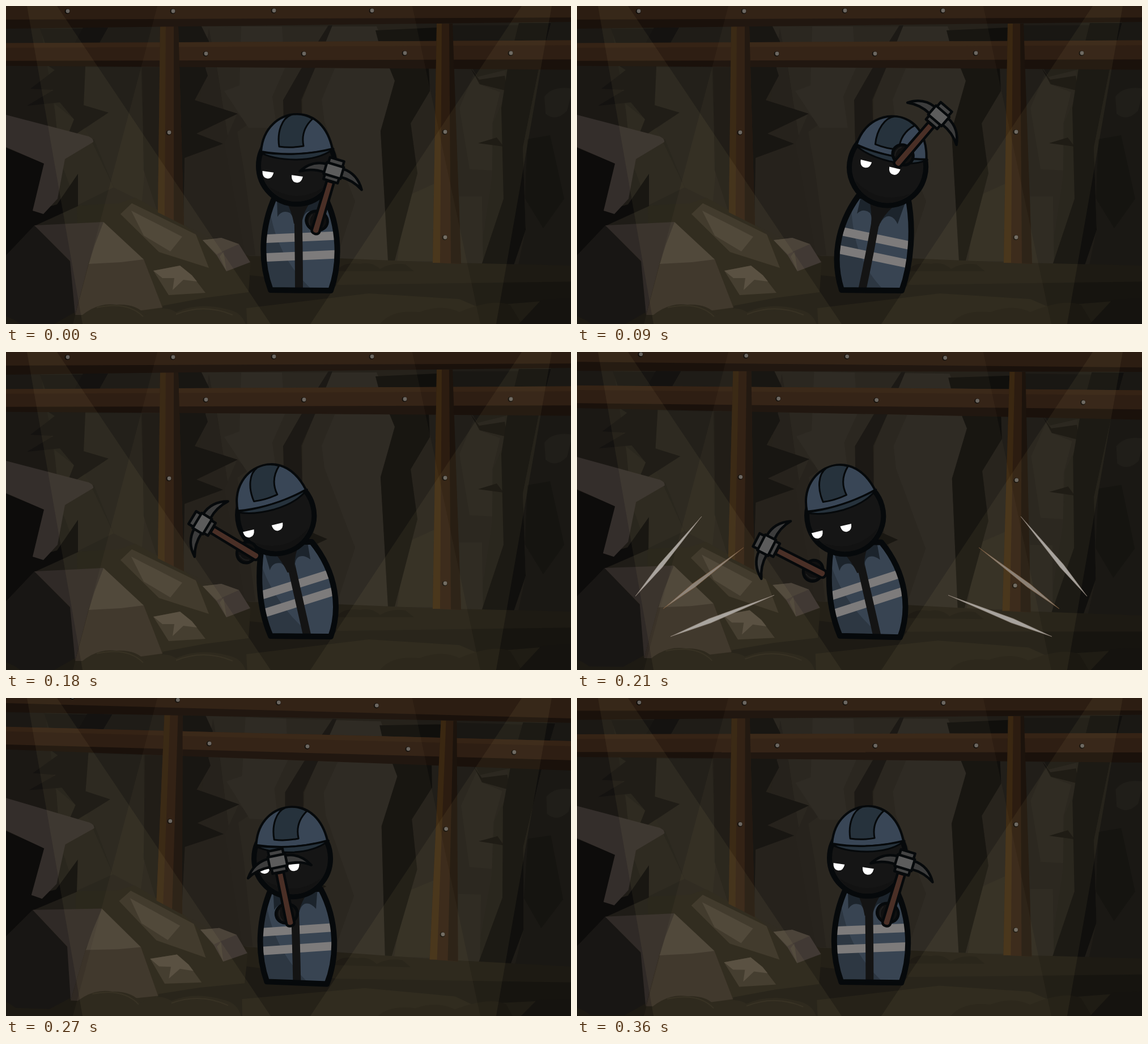
An HTML page for the animation above (0.42 s loop, 997 by 561 pixels).

```html
<!DOCTYPE html>
<html lang="en">
<head>
<meta charset="utf-8">
<title>Miner</title>
<style>
html, body { margin: 0; width: 100%; height: 100%; overflow: hidden; background: #12110e; }
svg { display: block; width: 100%; height: 100%; }
.ink { stroke: #06090b; stroke-linejoin: round; stroke-linecap: round; }
</style>
</head>
<body>
<svg viewBox="0 0 997 561" preserveAspectRatio="none">
<defs>
  <clipPath id="vest"><path id="vestClip"/></clipPath>
</defs>

<g id="cave">
  <path fill="#1f1c17" d="M-80-80H1080V650H-80Z"/>
  <!-- back wall -->
  <path fill="#1b1814" d="M-80 30H60L75 120L85 180L105 260L0 300H-80Z"/>
  <path fill="#23201a" d="M140 108L238 108L245 290L240 345L190 320L155 235L105 240L180 188L137 175Z"/>
  <path fill="#24211a" d="M85 172L140 215L190 320L125 352L95 270Z"/>
  <path fill="#171512" d="M60 40H178L150 68H70Z"/>
  <path fill="#141210" d="M136 38H180L142 106H100Z"/>
  <path fill="#141210" d="M75 106H140L137 175L181 188L105 238L120 200L95 170L37 176L84 148L43 146L86 113Z"/>
  <path fill="#1a1713" d="M240 108H275L268 365L243 290Z"/>
  <path fill="#24211c" d="M345 36H575L520 115L492 165L490 215L500 445H425L397 270L372 108Z"/>
  <path fill="#1f1c18" d="M358 40L372 110L425 440L312 385L315 268L340 180Z"/>
  <path fill="#201d19" d="M408 190L428 208L408 222L420 290L440 440H422L385 243Z"/>
  <path fill="#282520" d="M415 36H487L492 110L470 160L478 215H428L385 150L412 140Z"/>
  <path fill="#110f0d" d="M304 34H344L358 62L352 110L356 123L333 166L409 190L336 225L383 243L315 268L313 385L300 378Z"/>
  <path fill="#282520" d="M575 36H654L686 110L686 135L661 220L675 449H585L523 215V165L545 110Z"/>
  <path fill="#24211c" d="M545 110H580L557 165L562 205L616 345L585 440L523 260V165Z"/>
  <path fill="#151310" d="M569 34H576L546 108L521 165L523 240H491L489 166L520 112Z"/>
  <path fill="#12100d" d="M520 310L567 330L535 345Z"/>
  <path fill="#211e19" d="M745 110H880L885 150L860 205L858 300L835 457H680L725 295L714 205Z"/>
  <path fill="#26231c" d="M706 336L757 313L755 450H690Z"/>
  <path fill="#100f0c" d="M652 43L760 38V110H746L748 150L714 207L726 295L686 449H674L661 221L686 132L677 110L700 62H657Z"/>
  <path fill="#191713" d="M788 34H905L885 112L832 125L822 108H790Z"/>
  <path fill="#25221c" d="M826 118L835 138L872 152L858 208V290L818 288L800 180Z"/>
  <path fill="#13110e" d="M820 110L835 130L880 123L885 150L836 138ZM833 242L866 232L878 248Z"/>
  <path fill="#25221c" d="M800 336H840L842 457H800Z"/>
  <path fill="#100f0d" d="M905 30H962L940 112L912 250L917 395L895 460H838L878 340L874 180L885 110Z"/>
  <path fill="#1a1814" d="M962 28H1080V500H895L917 395L912 250L940 112Z"/>
  <path fill="#151410" d="M920 235L960 228L985 340L948 392L916 340Z"/>
  <path fill="#201e19" d="M950 160Q965 140 1000 146L990 185Q970 205 952 190Z"/>

  <!-- ground -->
  <path fill="#1d1a13" d="M-80 400H300L430 441L585 445L755 452L1080 460V650H-80Z"/>
  <path fill="#18150f" d="M583 468Q595 450 625 455Q645 450 660 464Q680 452 705 456L720 468Z"/>
  <path fill="#16140f" d="M430 475L590 492L1080 485V650H240L280 520Z"/>
  <path fill="#1f1c14" d="M424 533L640 507L800 517L830 530L1080 510V650H430Z"/>
  <path fill="#1b1811" d="M660 561Q680 535 730 540Q770 525 800 540Q860 515 890 528L910 561Z"/>
  <path fill="#15130f" d="M905 561L945 518L1080 512V650H905Z"/>

  <!-- rocks -->
  <path fill="#201d15" d="M125 352L200 348L228 338L312 384L352 418L432 450L428 505L350 515L270 530L130 540Z"/>
  <path fill="#0d0c0b" d="M-80 240L0 250L68 278L48 362L90 350L127 296L127 353L50 388L0 440H-80Z"/>
  <path fill="#342e2b" d="M-80 172L0 192L146 230Q155 234 154 240L104 270L91 340L66 367L47 361L67 278L0 249L-80 215Z"/>
  <path fill="#181614" d="M-80 440H0L50 387L114 452L122 540L85 561H25Q0 540-80 530Z"/>
  <path fill="#302a27" d="M50 387L172 381L158 423L146 453L122 545L113 450Z"/>
  <path fill="#302923" d="M146 453L243 447L276 532L180 545H122Z"/>
  <path fill="#423b33" d="M172 381L243 447L203 452L156 423ZM156 423L203 452L146 455Z"/>
  <path fill="#322c23" d="M222 348L335 403L358 462L270 434L202 367Z"/>
  <path fill="#423b32" d="M221 361L311 407L290 433L243 405Z"/>
  <path fill="#3b3430" d="M347 413L380 409L411 420L431 452L389 468L372 440Z"/>
  <path fill="#453e36" d="M347 413L380 409L411 420L382 433L372 438ZM384 433L389 468L377 442Z"/>
  <path fill="#352f26" d="M260 467L307 458L328 475L352 506L287 510Z"/>
  <path fill="#4b443a" d="M260 467L307 458L328 475L337 486L313 483L294 501L297 480L276 480Z"/>
  <path fill="#1d1a13" d="M110 570Q150 520 195 527Q230 525 246 545Q275 525 300 540Q340 522 390 535Q420 540 425 570Z"/>
  <path fill="none" stroke="#262219" stroke-width="2" d="M160 532Q215 520 242 548M300 544Q350 524 400 545"/>

  <!-- timber -->
  <path fill="#2e1e13" d="M-80 66L1080 60V98L-80 98Z"/>
  <path fill="#352315" d="M-80 66L1080 60V69L-80 74Z"/>
  <path fill="#1a110b" d="M-80 97L1080 94V113L-80 105Z"/>
  <path fill="#2c1c10" d="M272 36H304L314 387L268 364Z"/>
  <path fill="#352411" d="M272 36H282L280 370L268 364Z"/>
  <path fill="#1c130c" d="M296 36H304L314 387L296 378Z"/>
  <path fill="#2c1c10" d="M760 31H787L803 455L753 453Z"/>
  <path fill="#3a2711" d="M760 31H769L766 453H753Z"/>
  <path fill="#1c130c" d="M782 31H788L803 455L785 454Z"/>
  <path fill="#2c1d12" d="M-8-80H1080V22L-8 25Z"/>
  <path fill="#1a110b" d="M-8 24L1080 20V27L-8 40Z"/>
  <g id="bolts"></g>
</g>

<g id="light" fill="#ffdc96">
  <path fill-opacity=".03" d="M267 0H717L837 561H118Z"/>
  <path fill-opacity=".05" d="M37 0H90L467 561H135Z"/>
  <path fill-opacity=".05" d="M910 0H963L865 561H537Z"/>
</g>

<g id="miner">
  <path id="body" fill="#384452"/>
  <g clip-path="url(#vest)">
    <path id="shade" fill="#2d3742"/>
    <g fill="#7d7b7b">
      <rect id="band1" x="-85" y="-7.5" width="170" height="15"/>
      <rect id="band2" x="-85" y="-7.5" width="170" height="15"/>
    </g>
    <path id="seam" fill="none" stroke="#141414" stroke-width="14"/>
    <g id="collar">
      <path fill="#1c242c" d="M-37-20L-36 22Q-28 9-14 15L-4 28H8Q12 12 22 12Q30 12 38 22L42-20Z"/>
      <path fill="#141414" d="M-22-10Q-10 15-7 34H7Q8 15 26-10Z"/>
    </g>
  </g>
  <path id="edge" class="ink" fill="none" stroke-width="10"/>

  <g id="head">
    <circle class="ink" r="67.5" fill="#151515" stroke-width="9"/>
    <path fill="#121212" d="M-50 36Q0 70 50 36Q30 63 0 63Q-30 63-50 36Z"/>
    <path class="ink" stroke-width="4" fill="#394656" d="M-63-25C-60-68-30-91 1-91C32-91 55-68 63-30Q0-14-63-25Z"/>
    <path class="ink" stroke-width="3" fill="#26323c" d="M-31-34C-35-60-26-84-10-90Q10-94 28-83C14-70 8-55 12-35Q-10-31-31-34Z"/>
    <path class="ink" stroke-width="3" fill="#26323c" d="M-65-24Q0-15 65-30Q42-12 0-11Q-42-11-65-24Z"/>
  </g>
  <g id="eyes" fill="#fff">
    <path d="M-36-5H-16Q-17 7-26 7Q-35 7-36-5Z"/>
    <path d="M16-5H36Q35 7 26 7Q17 7 16-5Z"/>
  </g>

  <g id="pick" class="ink" stroke-width="4.5">
    <ellipse cx="-3" cy="-19" rx="19" ry="17" fill="#101010" stroke-width="5"/>
    <path fill="none" stroke="#1d1d1d" stroke-width="2" d="M-14-27Q-19-18-13-9"/>
    <path fill="#4a2f26" d="M-6.5-92H6.5L7-1Q6 4 0 4Q-6 4-7-1Z"/>
    <g id="blades" fill="#3c3c3c">
      <path d="M15-120Q42-119 57-94Q38-106 15-105Z"/>
      <path d="M-15-120Q-42-119-57-94Q-38-106-15-105Z"/>
    </g>
    <path fill="#444" d="M-13-133H13V-122H-13ZM-13-103H13V-93H-13Z"/>
    <path fill="#5c5c5c" d="M-15.5-123H15.5V-102H-15.5Z"/>
  </g>
</g>
<g id="sparks"></g>
</svg>

<script>
const $ = id => document.getElementById(id);
const set = (id, name, value) => $(id).setAttribute(name, value);
const move = (id, x, y, a) => set(id, 'transform', `translate(${x} ${y}) rotate(${a})`);

const STEP = 30, LOOP = 420, LAST = 12;

// step, lean, eyes x, y, angle, pick x, y, angle
const poses = [
  [0, 0, 487.5, 301, 8, 546, 398, 16.7],
  [3, 14.3, 534.5, 284.5, 14, 565, 279, 40.7],
  [5, -12, 463.5, 309, -11, 458, 320, -47],
  [7, -16.2, 450.5, 316.5, -14, 436.5, 392.5, -63.8],
  [8, -6.7, 476, 302.5, -12, 480, 397, -33],
  [10, -1.3, 486, 300, -1, 524, 398, .6],
  [12, 0, 487.5, 301, 8, 546, 398, 16.7]
];

// world tilt in degrees after the blow lands
const shake = { 7: .78, 8: 3.1, 9: 1.75, 10: .95, 11: .45, 12: .18 };

// tail and head of each left-hand spark
const sparks = {
  7: [[103, 431, 220, 290], [152, 453, 294, 345], [165, 502, 348, 429]],
  8: [[245, 256, 283, 208], [318, 323, 380, 282], [390, 414, 464, 384]]
};

const slope = (i, c) => (poses[i + 1][c] - poses[i][c]) / (poses[i + 1][0] - poses[i][0]);

function tangent(i, c) {
  if (i === 0 || i === poses.length - 1) return 0;
  const a = slope(i - 1, c), b = slope(i, c);
  return a * b <= 0 ? 0 : 2 * a * b / (a + b);
}

// monotone cubic between neighbouring poses
function value(k, c) {
  let i = 0;
  while (i < poses.length - 2 && poses[i + 1][0] <= k) i++;
  const h = poses[i + 1][0] - poses[i][0], u = (k - poses[i][0]) / h;
  const e = u * u * (3 - 2 * u);
  return poses[i][c] * (1 - e) + poses[i + 1][c] * e
    + h * u * (1 - u) * ((1 - u) * tangent(i, c) - u * tangent(i + 1, c));
}

function drawBody(L) {
  const left = `C${448 + .2 * L} 450 ${450 + .45 * L} 390 ${475 + 1.5 * L} 335`;
  const d = `M467 501${left}L${562 + 1.5 * L} 335C${590 + .35 * L} 390 590 455 573 502Z`;
  for (const id of ['body', 'vestClip', 'edge']) set(id, 'd', d);
  set('shade', 'd', `M${462 + 1.5 * L} 335C${470 + L} 410 ${495 + .3 * L} 460 545 505H430V335Z`);
  set('seam', 'd', `M${517 - L} 503Q${517 + .1 * L} 430 ${515 + 1.25 * L} 345`);
  move('band1', 518, 408, L - 2.5);
  move('band2', 518, 441, L - 2.5);
  move('collar', 515 + 1.35 * L, 350 + .02 * L * L, L);
}

function sparkPath([x0, y0, x1, y1]) {
  const dx = x1 - x0, dy = y1 - y0, len = Math.hypot(dx, dy);
  const w = len * .021, nx = -dy / len * w, ny = dx / len * w;
  const mx = x0 + dx * .38, my = y0 + dy * .38;
  return `M${x0} ${y0}L${mx + nx} ${my + ny}L${x1} ${y1}L${mx - nx} ${my - ny}Z`;
}

function drawSparks(k) {
  $('sparks').innerHTML = (sparks[k] || []).map((s, i) => {
    const other = [1003 - s[0], s[1], 1003 - s[2], s[3]];
    const edge = i === 1 ? '#7a5a3c' : '#8d8175';
    const fill = i === 1 ? '#958b80' : '#b5b1ac';
    return [s, other].map(p =>
      `<path d="${sparkPath(p)}" fill="${fill}" stroke="${edge}" stroke-width=".8" opacity=".9"/>`).join('');
  }).join('');
}

function draw(k) {
  const tilt = `rotate(${shake[k] || 0} 484 281)`;
  set('cave', 'transform', tilt);
  set('miner', 'transform', tilt);
  const [L, ex, ey, ea, px, py, pa] = [1, 2, 3, 4, 5, 6, 7].map(c => value(k, c));
  drawBody(L);
  move('head', 513 + 2.45 * L, 282 + .02 * L * L - .12 * L, L);
  move('eyes', ex, ey, ea);
  move('pick', px, py, pa);
  drawSparks(k);
}

const bolts = [[109, 9], [295, 9], [473, 8], [646, 8], [-12, 83], [353, 84], [526, 84],
  [704, 83], [891, 83], [288, 223], [775, 222], [775, 408]];
$('bolts').innerHTML = bolts.map(([x, y]) =>
  `<circle cx="${x - .8}" cy="${y + .5}" r="4.6" fill="#0f0c09"/><circle cx="${x}" cy="${y}" r="3.4" fill="#67635f"/>`).join('');

let shown = -1;
function tick() {
  const k = Math.min(LAST, Math.floor(performance.now() % LOOP / STEP));
  if (k !== shown) draw(shown = k);
  requestAnimationFrame(tick);
}
tick();
</script>
</body>
</html>
```
